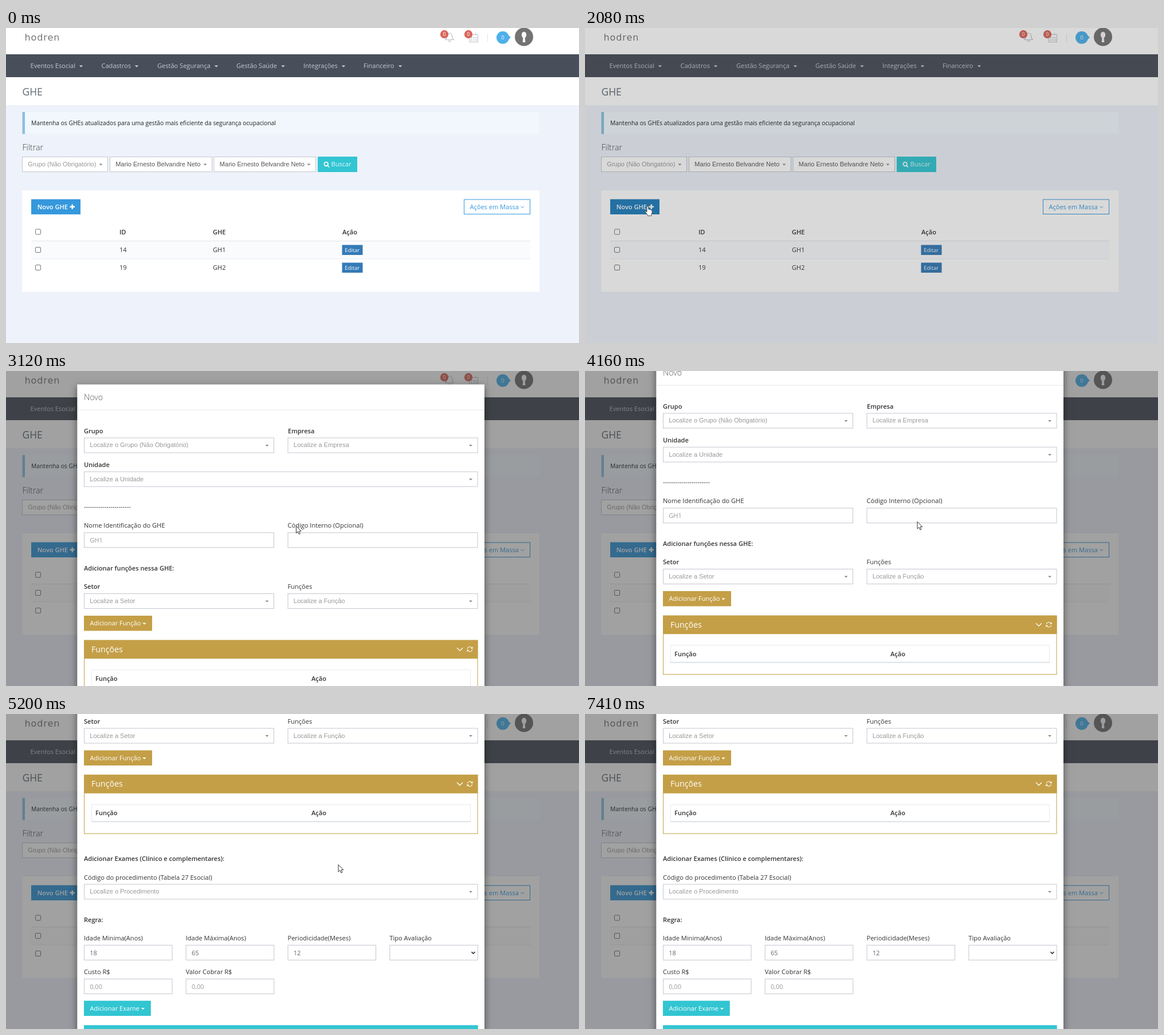
These frames come from a looping animation (1000x551 px, 7.54 s). An HTML page with a canvas:

```html
<!DOCTYPE html>
<html lang="pt">
<head>
<meta charset="utf-8">
<title>GHE</title>
<style>
  html, body { margin: 0; width: 100%; height: 100%; overflow: hidden; background: #eef2fa; }
  canvas { display: block; width: 100vw; height: 100vh; }
</style>
</head>
<body>
<canvas id="stage"></canvas>
<script>
const W = 1000, H = 551, LOOP = 7540, STEP = 130;
const canvas = document.getElementById('stage');
const ctx = canvas.getContext('2d');
const dpr = window.devicePixelRatio || 1;
canvas.width = W * dpr;
canvas.height = H * dpr;

const SANS = '"Open Sans", sans-serif';
const ARIAL = '"Liberation Sans", Arial, sans-serif';
const BASE = 11.06;
const BLUE = '#3598dc', TEAL = '#32c5d2', GOLD = '#c49f47';
const INK = '#333', GREY = '#999', EDGE = '#c2c7d0';
const PERSON = 'Mario Ernesto Belvandre Neto';

const clamp = v => Math.max(0, Math.min(1, v));
const smooth = p => p * p * (3 - 2 * p);
const mix = (a, b, p) => a + (b - a) * p;

// Text is placed by the middle of its capitals.
function text(str, x, y, { color = INK, size = BASE, weight = 400, family = SANS, align = 'left' } = {}) {
  ctx.font = `${weight} ${size}px ${family}`;
  ctx.textAlign = align;
  ctx.fillStyle = color;
  ctx.fillText(str, x, y + size * 0.36);
}

const bold = (str, x, y) => text(str, x, y, { weight: 600 });

function rect(x, y, x2, y2, color) {
  ctx.fillStyle = color;
  ctx.fillRect(x, y, x2 - x, y2 - y);
}

function frame(x, y, x2, y2, color, fill) {
  if (fill) rect(x, y, x2, y2, fill);
  ctx.strokeStyle = color;
  ctx.lineWidth = 1;
  ctx.strokeRect(x + 0.5, y + 0.5, x2 - x - 1, y2 - y - 1);
}

function disc(x, y, r, color) {
  ctx.fillStyle = color;
  ctx.beginPath();
  ctx.arc(x, y, r, 0, 7);
  ctx.fill();
}

function poly(points, fill, stroke, width = 1) {
  ctx.beginPath();
  points.forEach(([x, y], i) => i ? ctx.lineTo(x, y) : ctx.moveTo(x, y));
  if (fill) {
    ctx.closePath();
    ctx.fillStyle = fill;
    ctx.fill();
  }
  if (stroke) {
    ctx.strokeStyle = stroke;
    ctx.lineWidth = width;
    ctx.stroke();
  }
}

const caret = (x, y, color, r = 3) => poly([[x - r, y - r / 2], [x + r, y - r / 2], [x, y + r / 2]], color);
const chevron = (x, y, r, color, width) =>
  poly([[x - r, y - r / 2], [x, y + r / 2], [x + r, y - r / 2]], null, color, width);

function select(x, y, x2, label, color = GREY) {
  frame(x, y, x2, y + 27, EDGE, '#fff');
  text(label, x + 10.3, y + 13, { color, family: ARIAL });
  caret(x2 - 12.5, y + 14, '#888');
}

function input(x, y, x2, value = '', color = GREY) {
  frame(x, y, x2, y + 27, EDGE, '#fff');
  text(value, x + 10.3, y + 13.8, { color });
}

function checkbox(x, y) {
  ctx.beginPath();
  ctx.roundRect(x + 0.5, y + 0.5, 9, 9, 1.5);
  ctx.fillStyle = '#fff';
  ctx.fill();
  ctx.strokeStyle = '#767676';
  ctx.lineWidth = 1;
  ctx.stroke();
}

function badge(x, y) {
  disc(x, y, 7.2, '#d9675d');
  text('0', x, y, { color: '#fff', size: 8.5, align: 'center' });
}

function topBar() {
  rect(0, 0, W, 46, '#fff');
  ctx.letterSpacing = '0.9px';
  text('hodren', 32.5, 16.5, { color: '#777', size: 16, family: '"DejaVu Sans", sans-serif' });
  ctx.letterSpacing = '0px';

  // bell
  ctx.strokeStyle = '#b9c0c9';
  ctx.lineWidth = 1.2;
  ctx.beginPath();
  ctx.moveTo(767, 20.5);
  ctx.quadraticCurveTo(769.5, 18, 769.5, 14);
  ctx.arc(774, 13.5, 4.5, Math.PI, 0);
  ctx.quadraticCurveTo(778.5, 18, 781, 20.5);
  ctx.closePath();
  ctx.moveTo(771.5, 22);
  ctx.quadraticCurveTo(774, 25, 776.5, 22);
  ctx.stroke();

  // calendar
  frame(808.5, 11, 824, 25, '#b9c0c9');
  for (let i = 0; i < 6; i++) {
    const x = 811.5 + i % 3 * 4, y = 16 + (i / 3 | 0) * 4;
    rect(x, y, x + 2, y + 2, '#b9c0c9');
  }
  rect(812, 8.5, 813, 12, '#b9c0c9');
  rect(819, 8.5, 820, 12, '#b9c0c9');
  badge(765, 11);
  badge(807, 11);

  rect(840, 10, 841, 24, '#dfe2e8');
  poly([[874, 10], [881, 16.5], [874, 23]], '#4db0ea');
  disc(867, 16.8, 11, '#4db0ea');
  text('0', 867, 16.8, { color: '#fff', size: 9.5, align: 'center' });

  disc(904, 15.5, 16, '#737373');
  ctx.fillStyle = '#f6f6f6';
  ctx.beginPath();
  ctx.ellipse(904, 12, 4.2, 5.6, 0, 0, 7);
  ctx.fill();
  poly([[902.3, 16], [905.7, 16], [906.3, 25], [901.7, 25]], '#f6f6f6');
}

function navBar() {
  rect(0, 46, W, 86, '#484f5a');
  [['Eventos Esocial', 42.5, 131], ['Cadastros', 166.5, 228], ['Gestão Segurança', 264, 367],
   ['Gestão Saúde', 402, 483.5], ['Integrações', 519, 589], ['Financeiro', 624, 688]]
    .forEach(([label, x, cx]) => {
      text(label, x, 66, { color: '#c4cad3' });
      caret(cx, 67, '#d5dae1', 3.2);
    });
}

function filters() {
  rect(28.5, 147, 931, 185.5, '#f1f7fc');
  rect(28.5, 147, 33, 185.5, '#8bbfe0');
  text('Mantenha os GHEs atualizados para uma gestão mais eficiente da segurança ocupacional',
    44, 166, { color: '#222', size: 10.27 });
  text('Filtrar', 28.5, 209, { color: '#444', size: 14.2, weight: 300 });

  select(28, 225, 178, 'Grupo (Não Obrigatório)');
  select(181, 225, 360, PERSON, '#555');
  select(362.5, 225, 541, PERSON, '#555');
  rect(544, 225, 613, 252, TEAL);
  ctx.strokeStyle = '#fff';
  ctx.lineWidth = 1.7;
  ctx.beginPath();
  ctx.arc(558.7, 238, 3.3, 0, 7);
  ctx.moveTo(561.2, 240.6);
  ctx.lineTo(564, 243.5);
  ctx.stroke();
  text('Buscar', 567.5, 238.5, { color: '#e4fafc' });
}

function listCard(hover) {
  rect(28.5, 284, 931, 461.5, '#fff');
  rect(44, 299.5, 130, 326, hover ? '#217ebd' : BLUE);
  text('Novo GHE', 54.7, 312.7, { color: '#fff', weight: 600 });
  rect(111.5, 311.4, 120, 314, '#fff');
  rect(114.5, 308.5, 117, 317, '#fff');

  frame(799, 299.5, 915, 326, BLUE, '#fff');
  text('Ações em Massa', 809.5, 312.7, { color: BLUE });
  chevron(901.3, 313.2, 2.8, BLUE, 1);

  checkbox(51, 351.5);
  bold('ID', 198, 357.5);
  bold('GHE', 361, 357.5);
  bold('Ação', 587, 357.5);
  rect(44, 372, 915, 373, '#dfe4ea');
  rect(44, 373, 915, 403, '#fafbfd');
  rect(44, 403.3, 915, 404.3, '#e7ecf1');
  [['14', 'GH1', 388], ['19', 'GH2', 419]].forEach(([id, name, y]) => {
    checkbox(51, y - 5);
    text(id, 198, y);
    text(name, 361, y);
    rect(586.5, y - 8.5, 622.5, y + 9, '#337ab7');
    text('Editar', 591.3, y + 0.5, { color: '#fff', size: 9.48 });
  });
}

function page(hover) {
  rect(0, 0, W, H, '#eef2fa');
  topBar();
  navBar();
  rect(0, 86, W, 135, '#fff');
  text('GHE', 28.5, 111.5, { color: '#5f6a73', size: 17.4 });
  filters();
  listCard(hover);
}

function button(x2, y, label, cx, color) {
  rect(136, y, x2, y + 26.5, color);
  text(label, 146.5, y + 13.2, { color: '#fff' });
  caret(cx, y + 14, '#fff', 3.2);
}

function portlet(y, title, color) {
  rect(136, y, 823.5, y + 32.5, color);
  frame(136, y, 823.5, y + 103.5, color);
  text(title, 149, y + 16, { color: '#fff', size: 14.2 });
  chevron(792, y + 16, 5, '#fff', 1.3);
  ctx.strokeStyle = '#fff';
  ctx.lineWidth = 1.1;
  ctx.beginPath();
  ctx.arc(809.5, y + 16, 4.2, 3.3, 5.9);
  ctx.stroke();
  ctx.beginPath();
  ctx.arc(809.5, y + 16, 4.2, 0.2, 2.8);
  ctx.stroke();
  poly([[814.6, y + 11.5], [814.6, y + 15], [811.2, y + 15]], '#fff');
  poly([[804.4, y + 20.5], [804.4, y + 17], [807.8, y + 17]], '#fff');

  frame(149, y + 51.5, 811, y + 82.5, '#e7ecf1');
  rect(149, y + 81, 811, y + 83, '#dde2e8');
  bold('Função', 156, y + 67);
  bold('Ação', 533, y + 67);
}

function modal(dy, alpha) {
  ctx.save();
  ctx.globalAlpha = alpha;
  ctx.translate(0, dy);

  ctx.save();
  ctx.shadowColor = 'rgba(0,0,0,.5)';
  ctx.shadowBlur = 12 * dpr;
  ctx.shadowOffsetY = 4 * dpr;
  rect(124.3, -19.5, 835, 1560, '#fff');
  ctx.restore();

  text('Novo', 136, 2.5, { color: '#555', size: 14.2, weight: 300 });
  rect(124.3, 24.5, 835, 25.5, '#e5e5e5');

  bold('Grupo', 136, 62);
  bold('Empresa', 492, 62);
  select(136, 73.5, 468, 'Localize o Grupo (Não Obrigatório)');
  select(491.5, 73.5, 823.5, 'Localize a Empresa');
  bold('Unidade', 136, 121);
  select(136, 132.7, 823.5, 'Localize a Unidade');
  text('-'.repeat(23), 136, 194.5);

  text('Nome Identificação do GHE', 136, 227.5);
  text('Código Interno (Opcional)', 491.5, 227.5);
  input(136, 239.3, 468, 'GH1');
  input(491.5, 239.3, 823.5);

  bold('Adicionar funções nessa GHE:', 136, 301.7);
  bold('Setor', 136, 334.3);
  text('Funções', 491.5, 334.3);
  select(136, 346, 468, 'Localize a Setor');
  select(491.5, 346, 823.5, 'Localize a Função');
  button(255, 385, 'Adicionar Função', 241.5, GOLD);
  portlet(427.7, 'Funções', GOLD);

  bold('Adicionar Exames (Clínico e complementares):', 136, 574.8);
  text('Código do procedimento (Tabela 27 Esocial)', 136, 607);
  select(136, 618.8, 823.5, 'Localize o Procedimento');
  bold('Regra:', 136, 681.3);

  const cols = [136, 313.7, 491.5, 669.3];
  ['Idade Minima(Anos)', 'Idade Máxima(Anos)', 'Periodicidade(Meses)', 'Tipo Avaliação']
    .forEach((label, i) => text(label, cols[i], 713.6));
  ['18', '65', '12', ''].forEach((v, i) => input(cols[i], 725.3, cols[i] + 154.5, v, '#666'));
  chevron(815.5, 739, 3, '#333', 1.6);
  ['Custo R$', 'Valor Cobrar R$'].forEach((label, i) => {
    text(label, cols[i], 772.7);
    input(cols[i], 784.4, cols[i] + 154.5, '0,00');
  });
  button(252.8, 823, 'Adicionar Exame', 239, TEAL);
  portlet(866, 'Exames', TEAL);
  ctx.restore();
}

function arrow(x, y) {
  ctx.save();
  ctx.translate(x, y);
  poly([[0, 0], [0, 12.5], [2.9, 9.9], [4.9, 14.4], [6.9, 13.5], [5, 9.2], [8.8, 9]], '#fff', '#333');
  ctx.restore();
}

function hand(x, y) {
  ctx.save();
  ctx.translate(x, y);
  ctx.lineJoin = 'round';
  poly([[-1, 0.5], [0.5, -0.5], [1.6, 0.5], [1.8, 5], [4, 5.2], [6, 6], [8, 7], [8.2, 11], [6.8, 14],
    [6.8, 16.5], [0.2, 16.5], [0, 14.5], [-4, 9.5], [-3.6, 8.2], [-1, 9.8], [-1, 0.2]], '#fff', '#444', 0.9);
  ctx.restore();
}

// The pointer visits these points, easing between each pair.
const START = [640, 535], NEW = [109, 312], REST = [580, 263.5], EXIT = [1010, 560];
function pointer(t) {
  const go = (a, b, from, to) => {
    const p = smooth(clamp((t - from) / (to - from)));
    return [mix(a[0], b[0], p), mix(a[1], b[1], p)];
  };
  if (t < 520 || t >= 7020) return null;
  if (t < 2860) return go(START, NEW, 390, 1430);
  if (t < 6630) return go(NEW, REST, 2730, 3250);
  return go(REST, EXIT, 6500, 7020);
}

function scrollAt(t) {
  if (t < 4160) return 0;
  const u = Math.min(8, (t - 4160) / 130);
  return 43 + 62.9 * u - 2.84 * u * u;
}

function draw(t) {
  const pos = pointer(t);
  const onButton = pos && t < 2860 && pos[0] > 44 && pos[0] < 130 && pos[1] > 299 && pos[1] < 326;

  page(onButton && t < 2210);

  const dim = clamp((t - 2020) / 150);
  if (dim) rect(0, 0, W, H, `rgba(51,51,51,${0.46 * dim})`);

  const open = clamp((t - 2170) / 300);
  if (open) {
    const drop = 420 * Math.pow(1 - open, 1.75);
    modal(43 - drop - scrollAt(t), clamp(open * 2));
  }

  if (pos) (onButton ? hand : arrow)(...pos);
}

const began = performance.now();
function tick() {
  const t = (performance.now() - began) % LOOP;
  ctx.setTransform(dpr, 0, 0, dpr, 0, 0);
  draw(Math.floor(t / STEP) * STEP);
  requestAnimationFrame(tick);
}
tick();
</script>
</body>
</html>
```
